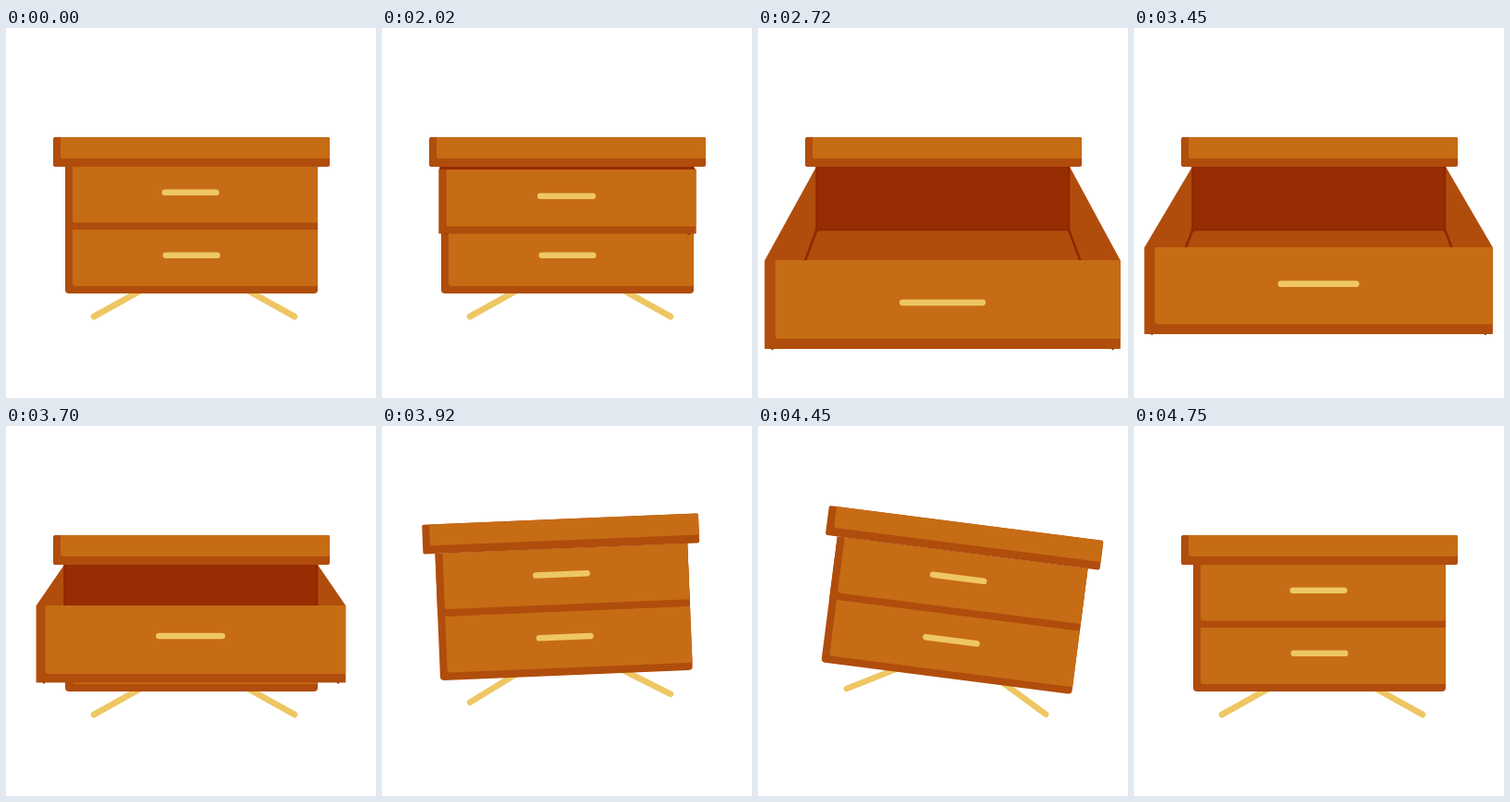
Write an HTML page with a canvas that moves like this. It is 400x400 px and loops after 4770 ms.

```html
<!DOCTYPE html>
<html lang="en">
<head>
<meta charset="utf-8">
<title>Chest of drawers</title>
<style>
html, body { margin: 0; width: 100%; height: 100%; overflow: hidden; background: #fff; }
canvas { display: block; width: 100vw; height: 100vh; object-fit: contain; }
</style>
</head>
<body>
<canvas width="400" height="400"></canvas>
<script>
const ctx = document.querySelector('canvas').getContext('2d');
const LOOP = 4770;
const WOOD = '#c66c15', SHADE = '#b04d0c', WALL = '#982d03', EDGE = '#902802', GOLD = '#eec764';

// Drawer timing: slides out, then slams shut and starts the hop.
const OPEN_AT = 2010, OPEN_TIME = 1000, CLOSE_AT = 3000, SHUT_AT = 3855;

// Hop and rock: time, tilt in degrees, lift in pixels.
const HOP = [[SHUT_AT, 0, 0], [4000, -5.5, 41], [4350, 8.6, 17], [4750, 0, 0]];

const clamp = v => Math.min(1, Math.max(0, v));
const mix = (a, b, k) => a + (b - a) * k;
const easeInOut = u => (1 - Math.cos(Math.PI * u)) / 2;

function slide(t, outPower, inPower = outPower) {
  if (t < CLOSE_AT) return 1 - (1 - clamp((t - OPEN_AT) / OPEN_TIME)) ** outPower;
  return 1 - clamp((t - CLOSE_AT) / (SHUT_AT - CLOSE_AT)) ** inPower;
}

function hopPose(t) {
  const i = HOP.findIndex(key => t < key[0]);
  if (i < 1) return [0, 0];
  const [a, b] = [HOP[i - 1], HOP[i]];
  const k = easeInOut((t - a[0]) / (b[0] - a[0]));
  return [mix(a[1], b[1], k), mix(a[2], b[2], k)];
}

// Corner radii run clockwise from the top left.
function box(left, top, right, bottom, color, radii = 0) {
  ctx.beginPath();
  ctx.roundRect(left, top, right - left, bottom - top, radii);
  ctx.fillStyle = color;
  ctx.fill();
}

function line(points, color, width) {
  ctx.beginPath();
  points.forEach(p => ctx.lineTo(...p));
  ctx.strokeStyle = color;
  ctx.lineWidth = width;
  ctx.stroke();
}

function shape(points, color) {
  ctx.beginPath();
  points.forEach(p => ctx.lineTo(...p));
  ctx.fillStyle = color;
  ctx.fill();
}

function handle(x, y, width) {
  const reach = width / 2 - 3.3;
  line([[x - reach, y], [x + reach, y]], GOLD, 6.6);
}

function drawBase() {
  line([[95, 312], [150, 281.4]], GOLD, 6.6);
  line([[312, 312], [257, 281.4]], GOLD, 6.6);
  box(64, 150, 337, 287, SHADE, [0, 0, 4, 4]);
  box(72, 218, 337, 279, WOOD, [0, 0, 0, 3]);
  handle(200.5, 245.7, 62);
}

function drawTopDrawer(t) {
  const drop = slide(t, 3), grow = slide(t, 4), grip = slide(t, 3, 2.6);
  const left = 64 - 57 * grow, right = 337 + 55 * grow;
  const scale = (right - left) / 273;
  const bottom = 218 + 132 * drop, top = bottom - 68 * scale;

  if (drop > 0) {
    shape([[63, 150], [337, 150], [right, top], [right, bottom], [left, bottom], [left, top]], SHADE);
    box(63, 150, 337, 218, WALL);
    line([[left + 8, bottom], [63.5, 218], [63.5, 150]], EDGE, 2.6);
    line([[right - 8, bottom], [336, 218], [336, 150]], EDGE, 2.6);
    line([[63.5, 218], [336, 218]], EDGE, 2.6);
  }
  box(left, top, right, bottom, SHADE);
  box(left + 8 * scale, top, right, bottom - 7.6 * scale, WOOD, [0, 0, 0, 3 * scale]);
  handle(199.5, 177.8 + 122 * grip, 62 + 32 * grip);
}

function drawLid() {
  box(51, 118, 350, 150, SHADE, 2);
  box(59, 118, 350, 141, WOOD, [0, 2, 0, 3]);
}

function draw(now) {
  const t = now % LOOP;
  const [tilt, lift] = hopPose(t);
  ctx.fillStyle = '#fff';
  ctx.fillRect(0, 0, 400, 400);
  ctx.lineCap = ctx.lineJoin = 'round';
  ctx.save();
  ctx.translate(201, 312 - lift);
  ctx.rotate(tilt * Math.PI / 180);
  ctx.translate(-201, -312);
  drawBase();
  drawTopDrawer(t);
  drawLid();
  ctx.restore();
}

const start = performance.now();
function tick() {
  draw(performance.now() - start);
  requestAnimationFrame(tick);
}
tick();
</script>
</body>
</html>
```
